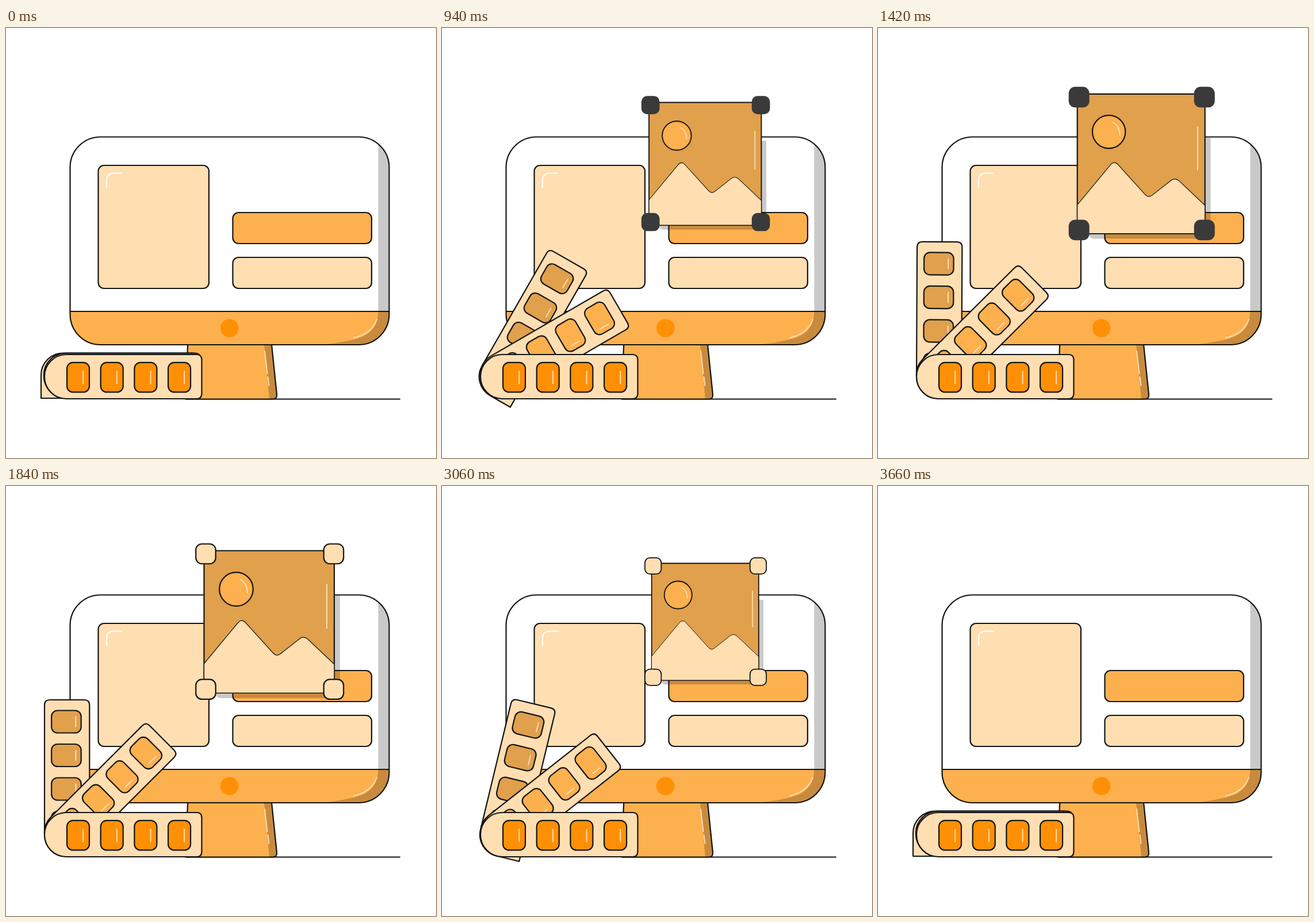
Recreate the animation shown at these times as an HTML page. Size 748x748 px, loop 4180 ms.

```html
<!DOCTYPE html>
<html lang="en">
<head>
<meta charset="utf-8">
<title>Colour swatches and picture</title>
<style>
  html, body { margin: 0; width: 100%; height: 100%; overflow: hidden; background: #fff; }
  svg { display: block; width: 100%; height: 100%; }
  .ink { stroke: #141414; stroke-width: 2.2; stroke-linejoin: round; stroke-linecap: round; }
  .shine { fill: none; stroke: #ffdeb2; stroke-width: 2; stroke-linecap: round; }
  .pale { fill: #ffdeb2; }
  .mid { fill: #fdb04e; }
  .hot { fill: #ff9005; }
  .tan { fill: #e0a04c; }
  .shade { fill: #000; fill-opacity: .21; }
</style>
</head>
<body>
<svg viewBox="0 0 748 748">
  <defs>
    <clipPath id="body"><rect x="111.5" y="189.5" width="555" height="361.5" rx="53"/></clipPath>
  </defs>

  <path class="ink" d="M314 645.5H685" stroke-width="1.8"/>
  <path class="mid ink" d="M316.500 545L312 645.500H464Q472 645.500 471 637L461.500 545Z"/>
  <path class="shade" d="M449 551H462L471 637Q472 645.500 464 645.500H458Z"/>
  <path class="shine" d="M450 562L454.500 601M455.500 607L457.500 622"/>

  <g clip-path="url(#body)">
    <rect x="111" y="189" width="557" height="363" fill="#fff"/>
    <rect class="mid" x="111" y="493" width="557" height="60"/>
    <path class="shade" d="M647.500 189H668V552H540Q600 546 622 536Q647 524 647.500 493Z"/>
    <path class="ink" d="M111 493H668"/>
  </g>
  <path class="shine" d="M605 539Q636 532 645 507"/>
  <rect class="ink" x="111.5" y="189.5" width="555" height="361.5" rx="53" fill="none"/>
  <circle class="hot" cx="388.700" cy="522" r="15.800"/>

  <rect class="pale ink" x="160.500" y="239" width="192.500" height="214" rx="10"/>
  <path class="shine" style="stroke:#fff" d="M175 277V265Q175 252.500 188 252.500H201"/>
  <rect class="mid ink" x="394.500" y="321" width="241.500" height="54" rx="10"/>
  <rect class="pale ink" x="394.500" y="399" width="241.500" height="54" rx="10"/>

  <g id="picture">
    <path class="shade" d="M571 190H581V369H374Q366 369 364 360H571Z"/>
    <rect class="tan ink" x="344.500" y="112.500" width="226.500" height="247.500"/>
    <path class="pale ink" style="stroke-width:1.2" d="M344.500 309L403 238.500Q410 230 417 238L465 291Q471 297.500 478 291.500L511 265.500Q518 260.500 525 266.500L571 310V360H344.500Z"/>
    <circle class="mid ink" cx="400.500" cy="179.500" r="29.300"/>
    <path class="shine" d="M407.500 163Q420 169 420 186M558 171V247"/>
    <g id="handles"></g>
  </g>

  <g id="rear"></g>
  <g id="middle"></g>
  <g id="front"></g>
</svg>
<script>
const LOOP = 4180;
const PIVOT = [103.3, 602];
const CENTRE = [458, 236];
const $ = id => document.getElementById(id);

const rect = (cx, cy, w, h, r, cls) =>
  `<rect class="${cls}" x="${cx - w / 2}" y="${cy - h / 2}" width="${w}" height="${h}" rx="${r}"/>`;

// Strip outline: right corners are small, left ones as given
function strip(left, right, top, bottom, topR, bottomR) {
  const r = 9;
  return `<path class="pale ink" d="M${left + topR} ${top}H${right - r}Q${right} ${top} ${right} ${top + r}` +
    `V${bottom - r}Q${right} ${bottom} ${right - r} ${bottom}H${left + bottomR}` +
    `A${bottomR} ${bottomR} 0 0 1 ${left} ${bottom - bottomR}V${top + topR}` +
    `A${topR} ${topR} 0 0 1 ${left + topR} ${top}Z"/>`;
}

function chips(first, step, cy, cls, shine) {
  let out = '';
  for (let i = 0; i < 4; i++) {
    const cx = first + step * i;
    out += rect(cx, cy, 39, 51.5, 10.5, cls + ' ink') + `<path class="shine" d="M${cx} ${cy}${shine}"/>`;
  }
  return out;
}

const alongEnd = 'm-8.5 16.5h17';
const alongSide = 'm8.7 -10.500v21.500';
$('rear').innerHTML = strip(-42.3, 230, -36.3, 42, 38, 0) + chips(16.5, 58.5, 1.6, 'tan', alongEnd);
$('middle').innerHTML = strip(-37.5, 234.5, -36.3, 41.9, 38, 39) + chips(20.8, 58.5, 1.8, 'mid', alongEnd);
$('front').innerHTML = strip(67, 340.5, 568, 645, 38, 38) + chips(125.5, 58.7, 607.7, 'hot', alongSide);
$('handles').innerHTML = [347.5, 570].map(x =>
  [118, 353.7].map(y => rect(x, y, 34.5, 34.5, 10.5, 'ink')).join('')).join('');

const clamp = v => Math.min(1, Math.max(0, v));

// Cubic easing with flat ends; a and b are the control point times
function ease(p, a, b) {
  p = clamp(p);
  let lo = 0, hi = 1;
  for (let i = 0; i < 30; i++) {
    const u = (lo + hi) / 2, v = 1 - u;
    if (3 * a * u * v * v + 3 * b * u * u * v + u * u * u < p) lo = u; else hi = u;
  }
  return lo * lo * (3 - 2 * lo);
}

const rise = (t, start, length) => ease((t - start) / length, .33, .05);
const fall = (t, start, length) => ease((t - start) / length, .42, .58);
const mix = (a, b, k) => a.map((v, i) => Math.round(v + (b[i] - v) * k));

function draw(t) {
  const size = rise(t, 40, 1755) - fall(t, 2840, 755);
  const pic = $('picture');
  pic.style.display = size > .001 ? '' : 'none';
  pic.setAttribute('transform',
    `translate(${CENTRE}) scale(${size}) translate(${-CENTRE[0]} ${-CENTRE[1]})`);

  const tint = clamp((t - 1640) / 200);
  $('handles').style.fill = `rgb(${mix([58, 58, 58], [255, 222, 178], tint)})`;
  for (const h of $('handles').children)
    h.style.stroke = `rgb(${mix([58, 58, 58], [20, 20, 20], tint)})`;

  const open = rise(t, 650, 845) - fall(t, 2840, 820);
  $('rear').setAttribute('transform', `translate(${PIVOT}) rotate(${-90 * open})`);
  $('middle').setAttribute('transform', `translate(${PIVOT}) rotate(${-45 * open})`);
}

const begin = performance.now();
function tick() {
  draw((performance.now() - begin) % LOOP);
  requestAnimationFrame(tick);
}
tick();
</script>
</body>
</html>
```
